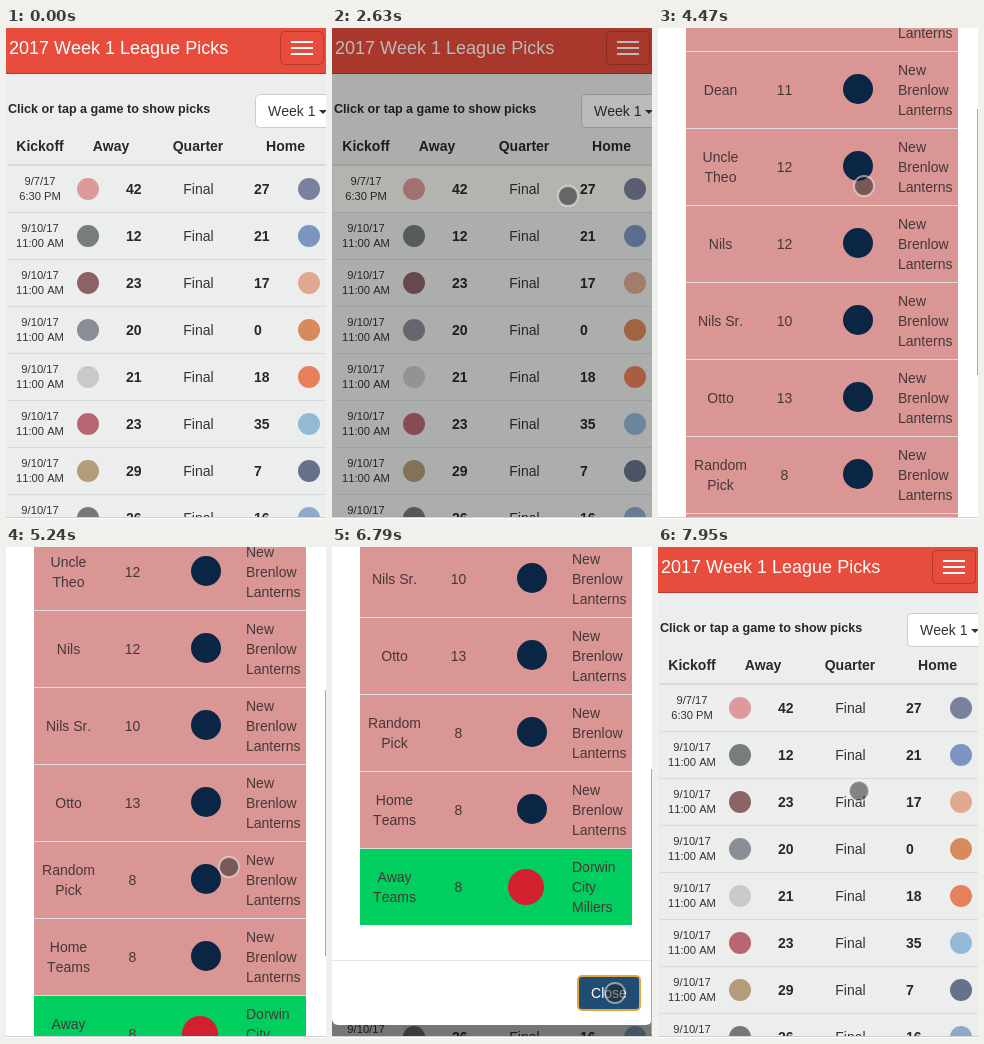
An HTML page for the animation above (8000 ms loop, 320x491 px).

```html
<!DOCTYPE html>
<html lang="en">
<head>
<meta charset="utf-8">
<title>League Picks</title>
<style>
@property --s { syntax: "<number>"; inherits: true; initial-value: 0; }
html, body { margin: 0; width: 100%; height: 100%; overflow: hidden; background: #eceeee; }
svg { display: block; width: 100%; height: 100%; }
text { font: 14px "Liberation Sans", Arial, sans-serif; font-kerning: none; fill: #333; }
.b { font-weight: bold; fill: #282828; }
.m { text-anchor: middle; }
.brand { font-size: 18px; fill: #fff; }
.hint { font-size: 12.6px; }
.date { font-size: 11.2px; }
.cell { fill: #453838; }

#hover, #shade, #modal, #press, #dot { animation: 8s linear infinite both; }
#hover { animation-name: hover; animation-timing-function: step-end; }
#shade { animation-name: shade; }
#modal { animation-name: fade, slide, scroll; }
#scroll { transform: translateY(round(var(--s) * -1px, 1px)); }
#thumb { transform: translateY(round(var(--s) * .54px - 6px, 1px)); }
#press { animation-name: press; animation-timing-function: step-end; }
#dot { animation-name: show, move; animation-timing-function: step-end, linear; }

@keyframes hover { 0% { opacity: 0 } 31.75% { opacity: 1 } 52% { opacity: 0 } }
@keyframes press { 0% { opacity: 0 } 84.8% { opacity: 1 } 90% { opacity: 0 } }
@keyframes show { 0% { opacity: 0 } 7.6% { opacity: 1 } }
@keyframes shade {
  0%, 31.87% { opacity: 0 }
  33.75%, 88.9% { opacity: .5 }
  90.8%, 100% { opacity: 0 }
}
@keyframes fade {
  0%, 33.75% { opacity: 0 }
  35.6%, 85.75% { opacity: 1 }
  87.6%, 100% { opacity: 0 }
}
@keyframes slide {
  0% { transform: translateY(-225px) }
  33.75% { transform: translateY(-225px); animation-timing-function: ease-out }
  37.6% { transform: none }
  85.75% { transform: none; animation-timing-function: ease-out }
  89.5%, 100% { transform: translateY(-225px) }
}
@keyframes scroll {
  0%, 52% { --s: 0 }
  55.8% { --s: 162 }
  56.5% { --s: 162; animation-timing-function: ease-out }
  61.6%, 62.6% { --s: 255 }
  65.4%, 66% { --s: 276 }
  69% { --s: 405; animation-timing-function: ease-out }
  72.25%, 100% { --s: 423 }
}
@keyframes move {
  0%, 7.6% { transform: translate(273px, 474px) }
  17.25% { transform: translate(257px, 220px) }
  18.2% { transform: translate(254px, 217px) }
  21.1% { transform: translate(241px, 178px) }
  24% { transform: translate(238px, 174px) }
  24.9%, 42.3% { transform: translate(236px, 168px) }
  43.3%, 44% { transform: translate(232px, 168px) }
  50.1%, 52% { transform: translate(227px, 343px) }
  55.8%, 57% { transform: translate(206px, 158px) }
  62%, 62.6% { transform: translate(229px, 343px) }
  65.4%, 66% { transform: translate(223px, 320px) }
  69%, 74% { transform: translate(213px, 154px) }
  81.75%, 86.9% { transform: translate(283px, 446px) }
  94.5% { transform: translate(219px, 261px) }
  99.3%, 100% { transform: translate(201px, 244px) }
}
</style>
</head>
<body>
<svg viewBox="0 0 320 491" preserveAspectRatio="none">
  <rect width="320" height="491" fill="#eceeee"/>
  <g id="page">
    <rect width="320" height="45" fill="#e74c3c"/>
    <rect y="45" width="320" height="1" fill="#b8392c"/>
    <text class="brand" x="3" y="26">2017 Week 1 League Picks</text>
    <rect x="274.5" y="3.5" width="43" height="33" rx="4" fill="none" stroke="#b53a2d"/>
    <path d="M285 14h22M285 20h22M285 26h22" stroke="#fff" stroke-width="2"/>
    <text class="b hint" x="2" y="85">Click or tap a game to show picks</text>
    <rect x="249.5" y="66.5" width="80" height="33" rx="4" fill="#fff" stroke="#ccc"/>
    <text x="262" y="88">Week 1</text>
    <path d="M313 82h8l-4 4z" fill="#333"/>
    <text class="b m" x="34" y="123">Kickoff</text>
    <text class="b m" x="105" y="123">Away</text>
    <text class="b m" x="192" y="123">Quarter</text>
    <text class="b m" x="279.5" y="123">Home</text>
    <rect x="2" y="136" width="318" height="2" fill="#d9dbdb"/>
    <rect id="hover" x="1" y="138" width="319" height="46" fill="#f5f5ef"/>
    <g id="games"></g>
  </g>
  <rect id="shade" width="320" height="491"/>
  <g id="modal">
    <g id="scroll">
      <rect y="5" width="320" height="896" rx="6" fill="#fff"/>
      <text class="b" x="13" y="35">Dorwin City at New Brenlow</text>
      <rect y="55" width="320" height="1" fill="#e5e5e5"/>
      <text class="b m" x="62.5" y="94">Name</text>
      <text class="b m" x="126.5" y="94">Points</text>
      <text class="b m" x="228" y="94">Pick</text>
      <rect x="28" y="107" width="272" height="2" fill="#ddd"/>
      <g id="picks"></g>
      <rect y="836" width="320" height="1" fill="#e5e5e5"/>
      <rect x="246.5" y="852.5" width="61" height="33" rx="4" fill="#337ab7" stroke="#2e6da4"/>
      <rect id="press" x="246" y="852" width="62" height="34" rx="4" fill="#204d74" stroke="#e2a63c" stroke-width="2"/>
      <text class="m" x="277" y="874" style="fill:#fff">Close</text>
    </g>
    <rect id="thumb" x="319" width="1" height="266" fill="#a8a8a8"/>
  </g>
  <rect y="489" width="320" height="1" fill="#d0d0d0"/>
  <rect y="490" width="320" height="1" fill="#fff"/>
  <g id="dot">
    <circle r="10" fill="#202020" fill-opacity=".52"/>
    <circle r="10" fill="none" stroke="#fff" stroke-opacity=".5" stroke-width="1.8"/>
  </g>
</svg>
<script>
const text = (x, y, str, cls = "") => `<text x="${x}" y="${y}" class="${cls}">${str}</text>`;
const badge = (x, y, r, fill) => `<circle cx="${x}" cy="${y}" r="${r}" fill="${fill}"/>`;
const line = (x, y, w, fill) => `<rect x="${x}" y="${y}" width="${w}" height="1" fill="${fill}"/>`;

// away score, home score, away colour, home colour
const games = [
  [42, 27, "#dc9a9a", "#7a819c"],
  [12, 21, "#777d7a", "#7c95c0"],
  [23, 17, "#8c6468", "#e0aa92"],
  [20, 0, "#8b8d96", "#d98a5c"],
  [21, 18, "#c9c9cc", "#e8805c"],
  [23, 35, "#b96672", "#94b9d6"],
  [29, 7, "#b39c78", "#68718c"],
  [26, 16, "#777", "#8fa9c8"]
];
document.getElementById("games").innerHTML = games.map(([away, home, c1, c2], i) => {
  const y = 161 + i * 47;
  return text(34, y - 4, i ? "9/10/17" : "9/7/17", "date m") +
    text(34, y + 11, i ? "11:00 AM" : "6:30 PM", "date m") +
    badge(82, y, 11, c1) + badge(303, y, 11, c2) +
    text(120, y + 5, away, "b") + text(192.5, y + 5, "Final", "m") +
    text(248, y + 5, home, "b") + line(2, y + 23, 318, "#d9dbdb");
}).join("");

const picks = [
  ["Monty Kestrow", 14], ["Dean", 11], ["Uncle Theo", 12], ["Nils", 12], ["Nils Sr.", 10],
  ["Otto", 13], ["Random Pick", 8], ["Home Teams", 8], ["Away Teams", 8]
];
document.getElementById("picks").innerHTML = picks.map(([name, points], i) => {
  const top = 108 + i * 77, mid = top + 39, won = i === 8;
  const lines = name.endsWith("Sr.") ? [name] : name.split(" ");
  const team = won ? ["Dorwin", "City", "Millers"] : ["New", "Brenlow", "Lanterns"];
  return `<rect x="28" y="${top + 1}" width="272" height="76" fill="${won ? "#00cf60" : "#d99694"}"/>` +
    (i ? line(28, top, 272, "#ddd") : "") +
    lines.map((s, k) => text(62.5, mid + 5 + (k - (lines.length - 1) / 2) * 20, s, "cell m")).join("") +
    text(126.5, mid + 5, points, "cell m") +
    (won ? badge(194, mid, 18, "#d3202f") : badge(200, mid - 1, 15, "#0b2545")) +
    team.map((s, k) => text(240, mid - 15 + k * 20, s, "cell")).join("");
}).join("");
</script>
</body>
</html>
```
